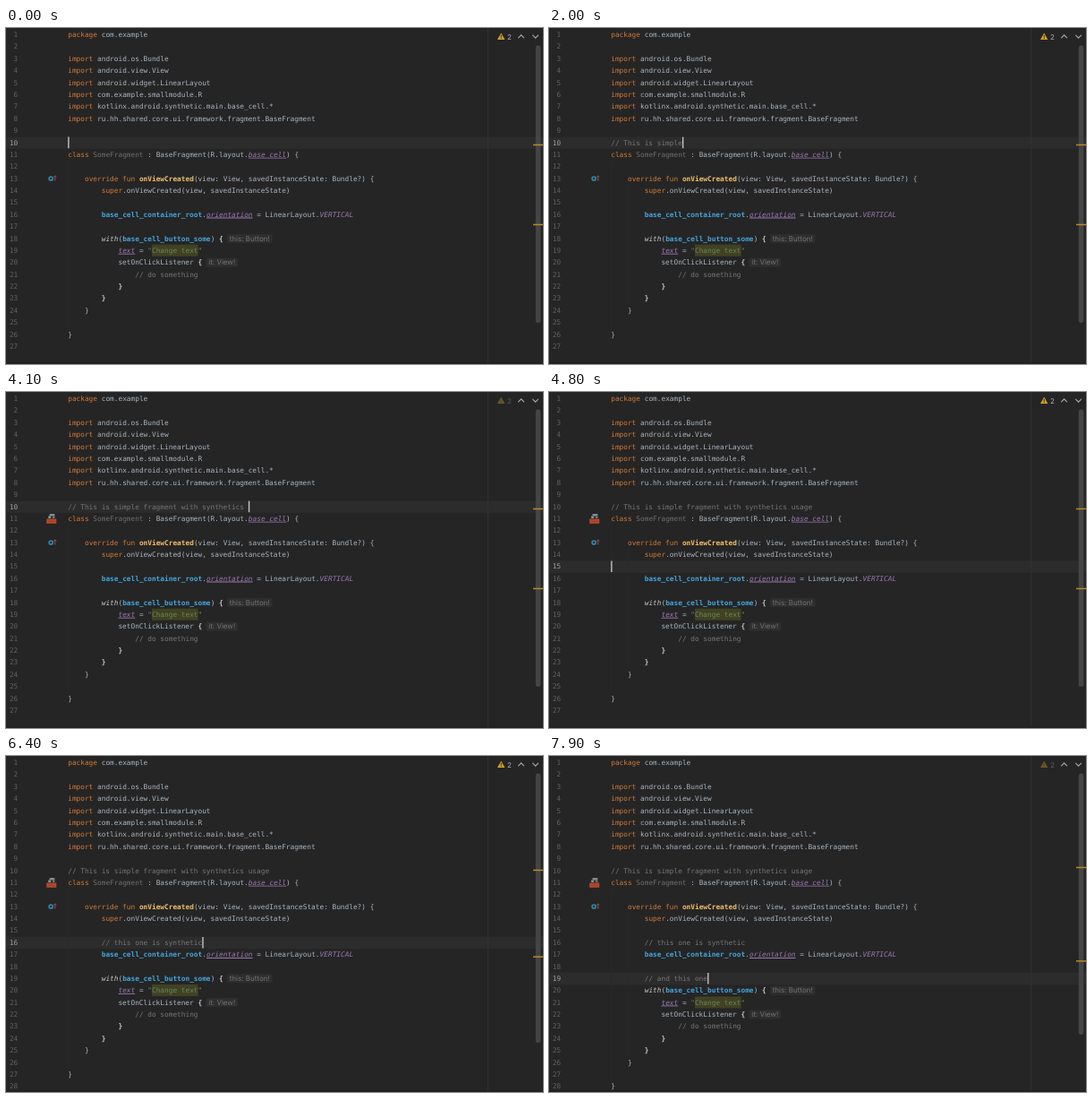
Animation, 600 px wide and 375 px high, one loop 8000 ms. Source, as an HTML page with a canvas:

```html
<!DOCTYPE html>
<html lang="en">
<head>
<meta charset="utf-8">
<title>Code editor</title>
<style>
html, body { margin: 0; width: 100%; height: 100%; overflow: hidden; background: #252525; }
canvas { display: block; width: 600px; height: 375px; }
</style>
</head>
<body>
<canvas id="stage"></canvas>
<script>
const LOOP = 8000, LEFT = 69.2, TOP = 0.7, LINE = 13.38, CHAR = 4.69;
const MONO = '7.79px "DejaVu Sans Mono", "Noto Sans Mono", monospace';
const SANS = '8px Inter, Roboto, sans-serif';

// Each piece of a line starts with a style letter; pieces are split by "|".
const styles = {
  n: { color: '#aab5c1' },
  k: { color: '#d07a38' },
  c: { color: '#767676' },
  u: { color: '#6e6f73' },
  f: { color: '#f2c06a', font: 'bold ' },
  b: { color: '#45a5dc', font: 'bold ' },
  i: { color: '#c6cbd0', font: 'italic ' },
  p: { color: '#9c78b0', font: 'italic ' },
  l: { color: '#9c78b0', font: 'italic ', underline: true },
  w: { color: '#c6cbd0', font: 'bold ' },
  s: { color: '#6a8759' },
  m: { color: '#6a8759', back: '#414124' },
  h: { hint: true }
};
const source = [
  'kpackage |ncom.example',
  '',
  'kimport |nandroid.os.Bundle',
  'kimport |nandroid.view.View',
  'kimport |nandroid.widget.LinearLayout',
  'kimport |ncom.example.smallmodule.R',
  'kimport |nkotlinx.android.synthetic.main.base_cell.*',
  'kimport |nru.hh.shared.core.ui.framework.fragment.BaseFragment',
  '',
  '',
  'kclass |uSomeFragment|n : BaseFragment(R.layout.|lbase_cell|n) {',
  '',
  'n    |koverride fun |fonViewCreated|n(view: View, savedInstanceState: Bundle?) {',
  'n        |ksuper|n.onViewCreated(view, savedInstanceState)',
  '',
  'n        |bbase_cell_container_root|n.|lorientation|n = LinearLayout.|pVERTICAL',
  '',
  'n        |iwith|n(|bbase_cell_button_some|n) |w{|hthis: Button!',
  'n            |ltext|n = |s"|mChange text|s"',
  'n            setOnClickListener |w{|hit: View!',
  'n                |c// do something',
  'n            |w}',
  'n        |w}',
  'n    }',
  '',
  'n}',
  ''
];

// Comments being typed: points are [time, characters typed].
const comments = [
  { text: '// This is simple fragment with synthetics usage',
    points: [[930, 0], [1800, 14], [2000, 17], [3300, 34], [3600, 37], [4500, 48]] },
  { text: '// this one is synthetic',
    points: [[4900, 0], [5200, 4], [5400, 6], [6300, 24]] },
  { text: '// and this one',
    points: [[6950, 0], [7200, 2], [7900, 15]] }
];

const canvas = document.getElementById('stage');
const ratio = window.devicePixelRatio || 1;
canvas.width = 600 * ratio;
canvas.height = 375 * ratio;
const ctx = canvas.getContext('2d');
ctx.scale(ratio, ratio);
ctx.textRendering = 'geometricPrecision';

const rowY = row => TOP + row * LINE;
const colX = col => LEFT + col * CHAR;

function rect(x, y, w, h, color, radius = 0) {
  ctx.fillStyle = color;
  ctx.beginPath();
  ctx.roundRect(x, y, w, h, radius);
  ctx.fill();
}

function text(str, x, y, color, font, align = 'left') {
  ctx.font = font;
  ctx.fillStyle = color;
  ctx.textAlign = align;
  ctx.fillText(str, x, y);
}

function stroke(points, color, width) {
  ctx.strokeStyle = color;
  ctx.lineWidth = width;
  ctx.beginPath();
  points.forEach(p => ctx.lineTo(...p));
  ctx.stroke();
}

function typed({ text, points }, t) {
  let count = 0;
  points.forEach(([time, n], i) => {
    if (t < time) return;
    const [endTime, end] = points[i + 1] || [time + 1, n];
    count = n + (end - n) * Math.min(1, (t - time) / (endTime - time));
  });
  return text.slice(0, Math.floor(count + 0.01));
}

function drawHint(label, x, y) {
  ctx.font = SANS;
  rect(x + 4, y + 1.8, ctx.measureText(label).width + 6, 10, '#2e2e2e', 2);
  text(label, x + 7, y + 9.5, '#747474', SANS);
}

function drawLine(line, row) {
  const y = rowY(row);
  let col = 0;
  for (const piece of line ? line.split('|') : []) {
    const style = styles[piece[0]], str = piece.slice(1), x = colX(col);
    const width = str.length * CHAR;
    if (style.hint) { drawHint(str, x, y); continue; }
    if (style.back) rect(x, y + 0.2, width, LINE - 0.4, style.back);
    // An underscore disappears into the underline.
    const shown = style.underline ? str.replace('_', ' ') : str;
    text(shown, x, y + 9.4, style.color, (style.font || '') + MONO);
    if (style.underline) rect(x, y + 10.2, width, 0.9, style.color);
    col += str.length;
  }
}

function drawGutterIcons(t) {
  ctx.lineCap = 'round';
  ctx.strokeStyle = '#2f86ad';
  ctx.lineWidth = 1.7;
  ctx.beginPath();
  ctx.arc(50.2, 168, 2, 0, 7);
  ctx.stroke();
  stroke([[54.8, 170.3], [54.8, 165]], '#a94f4a', 0.9);
  stroke([[53.6, 166.3], [54.8, 165], [56, 166.3]], '#a94f4a', 0.9);
  if (t < 2900) return;
  rect(48.5, 136, 6, 2.6, '#868e94', 1);
  rect(47.2, 138.4, 3, 2.6, '#868e94');
  rect(52, 138.4, 2.5, 2.6, '#6c757b');
  rect(45.3, 141.6, 11, 5.2, '#b8492c');
  rect(47, 143.7, 7.6, 0.9, '#8f3a26');
}

function drawSide(inserted, dim) {
  rect(591.8, 19.5, 5.6, 309.5 - 9 * inserted, '#454545', 2.5);
  for (const y of [129.7 - 3 * inserted, 218.7 + 4.7 * inserted])
    rect(589, y, 11, 1.5, '#b98a25');

  ctx.globalAlpha = dim ? 0.4 : 1;
  ctx.fillStyle = '#d79f2c';
  ctx.beginPath();
  [[553.2, 5.4], [557.4, 13], [549, 13]].forEach(p => ctx.lineTo(...p));
  ctx.fill();
  rect(552.7, 7.8, 1, 2.6, '#252525');
  rect(552.7, 11.1, 1, 1, '#252525');
  text('2', 560, 12.5, '#b0b0b0', SANS);
  ctx.globalAlpha = 1;
  stroke([[572.6, 10.9], [575.6, 7.9], [578.6, 10.9]], '#a8a8a8', 1.1);
  stroke([[588.6, 8.1], [591.6, 11.1], [594.6, 8.1]], '#a8a8a8', 1.1);
}

function caretAt(t, words) {
  if (t < 4700) return [9, words[0].length];
  if (t < 4900) return [14, 0];
  if (t < 6600) return [15, 8 + words[1].length];
  if (t < 6950) return [17, 0];
  return [18, 8 + words[2].length];
}

function draw(t) {
  const words = comments.map(c => typed(c, t));
  const inserted = (t >= 4900) + (t >= 6950);
  const lines = source.slice();
  lines[9] = 'c' + words[0];
  if (inserted > 0) lines.splice(15, 0, 'n        |c' + words[1]);
  if (inserted > 1) lines.splice(18, 0, 'n        |c' + words[2]);
  const [row, col] = caretAt(t, words);

  rect(0, 0, 600, 375, '#252525');
  rect(0, rowY(row) + 0.3, 600, LINE, '#2c2c2c');
  rect(538, 0, 1, 375, '#313131');
  rect(LEFT, rowY(11), 0.6, LINE * (14 + inserted), '#2a2a2a');
  rect(colX(4), rowY(13), 0.6, LINE * (10 + inserted), '#2a2a2a');

  lines.forEach((line, i) => {
    text(i + 1, 13.3, rowY(i) + 9.4, i === row ? '#a0a0a0' : '#5e6164', MONO, 'right');
    drawLine(line, i);
  });
  if (t < 500 || t >= 930) rect(colX(col), rowY(row) + 0.5, 1.4, LINE - 0.8, '#c4c4c4');

  drawGutterIcons(t);
  drawSide(inserted, t >= 7100 || (t >= 4000 && t < 4400));
  rect(0, 373.5, 600, 1.5, '#222');
}

function tick() {
  draw(performance.now() % LOOP);
  requestAnimationFrame(tick);
}
tick();
</script>
</body>
</html>
```
